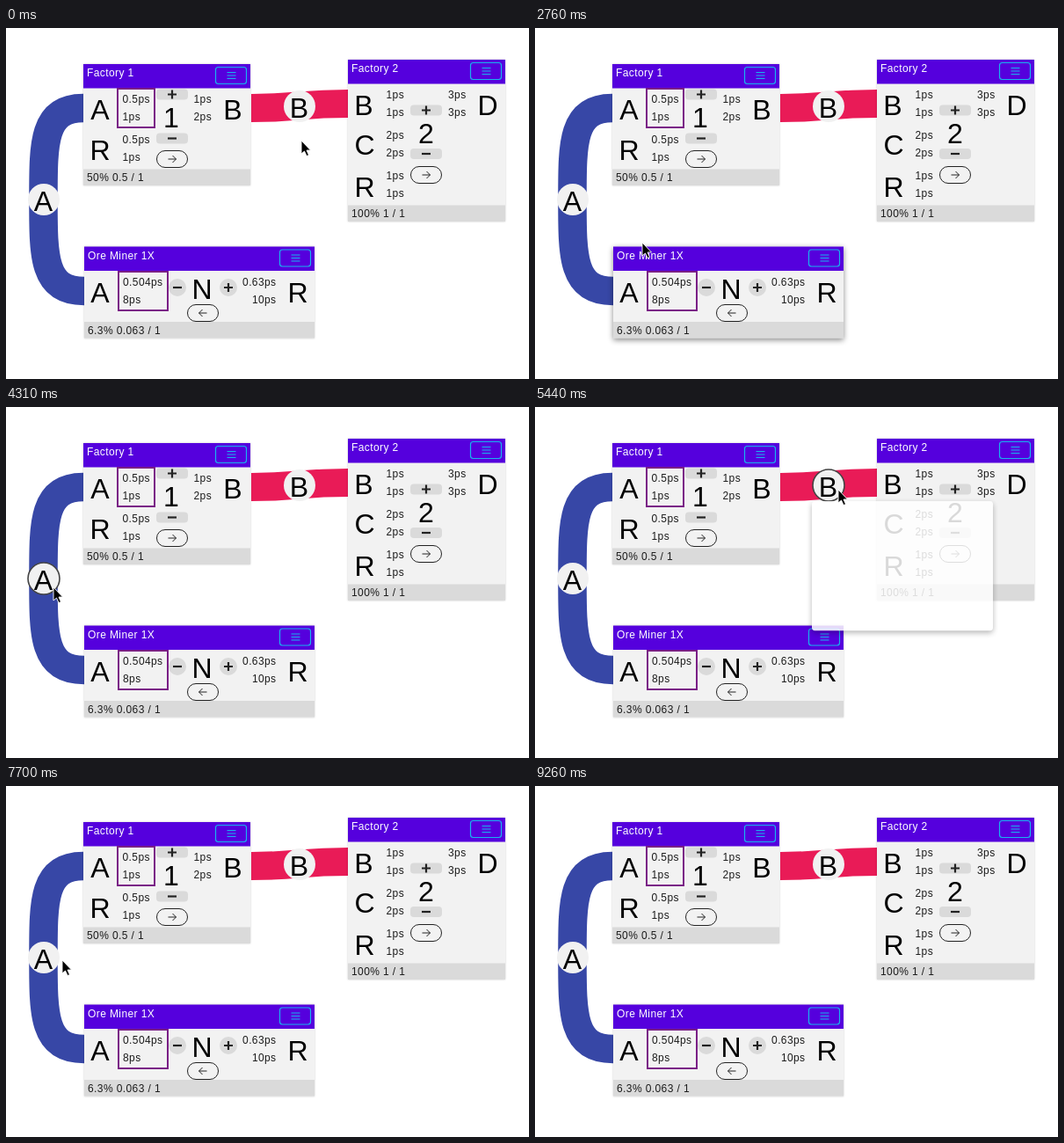
An HTML page that plays this animation: 595x399 px, repeating every 9510 ms.

```html
<!DOCTYPE html>
<html lang="en">
<head>
<meta charset="utf-8">
<title>Factory planner</title>
<style>
html, body { margin: 0; width: 100%; height: 100%; overflow: hidden; background: #fff; }
svg { display: block; width: 595px; height: 399px; }
text { font: 12px "Liberation Sans", Arial, sans-serif; letter-spacing: .4px; fill: #1c1c1c; }
.big { font-size: 32px; letter-spacing: 0; text-anchor: middle; fill: #000; }
.mid { font-size: 16px; letter-spacing: .1px; }
.bold { font-weight: bold; }
.end { text-anchor: end; }
.title { fill: #fff; }
.line { fill: none; stroke: #222; }
.card { filter: drop-shadow(0 0 1px #0003); }
.card.hover { filter: drop-shadow(0 2px 3px #0007); }
.panel { filter: drop-shadow(0 3px 4px #0005); }
.btn { fill: #fff; filter: drop-shadow(0 2px 2px #0005); }
.btn.hover { fill: #e9e9e9; }
</style>
</head>
<body>
<svg id="stage" viewBox="0 0 595 399"></svg>
<script>
const LOOP = 9510;
const stage = document.getElementById('stage');

const text = (x, y, s, cls = '') => `<text x="${x}" y="${y}" class="${cls}">${s}</text>`;
const rect = (x, y, w, h, fill, extra = '') =>
  `<rect x="${x}" y="${y}" width="${w}" height="${h}" fill="${fill}" ${extra}/>`;
const path = (d, extra = 'class="line"') => `<path d="${d}" ${extra}/>`;
const big = (x, y, s) => text(x, y, s, 'big');
const column = (x, ys, labels, cls) => labels.map((s, i) => text(x, ys[i], s, cls)).join('');

const sign = (x, y, plus) =>
  path(`M${x - 5} ${y}h10${plus ? `M${x} ${y - 5}v10` : ''}`, 'fill="none" stroke="#222" stroke-width="2.2"');
const barButton = (x, y, plus) => rect(x - 18, y - 6, 36, 12, '#dadada', 'rx="4"') + sign(x, y, plus);
const roundButton = (x, y, plus) => `<circle cx="${x}" cy="${y}" r="10" fill="#dadada"/>` + sign(x, y, plus);
const pill = (x, y, dir) => rect(x - 17.5, y - 9.5, 35, 19, 'none', 'rx="9.5" stroke="#222"') +
  path(`M${x - 4.5 * dir} ${y}h${9 * dir}m${-4 * dir} -4l${4 * dir} 4l${-4 * dir} 4`);
const portBox = (x, y, w) => rect(x, y, w, 44, 'none', 'stroke="#7a1f86" stroke-width="2"');

const cards = [
  { x: 88, y: 41, w: 190, h: 138, title: 'Factory 1', status: '50% 0.5 / 1',
    body: portBox(127, 69, 42) + big(107, 104, 'A') + big(107, 150, 'R') + big(258, 104, 'B') + big(188, 113, '1') +
      column(132.5, [85, 105, 131, 151], ['0.5ps', '1ps', '0.5ps', '1ps']) +
      column(213.5, [85, 105], ['1ps', '2ps']) +
      barButton(189, 75.5, true) + barButton(189, 125.5) + pill(189, 149, 1) },
  { x: 389, y: 36, w: 179, h: 184, title: 'Factory 2', status: '100% 1 / 1',
    body: big(407, 99, 'B') + big(408, 144, 'C') + big(408, 192, 'R') + big(548, 99, 'D') + big(478, 131, '2') +
      column(432.5, [80, 100, 126, 146, 172, 192], ['1ps', '1ps', '2ps', '2ps', '1ps', '1ps']) +
      column(503, [80, 100], ['3ps', '3ps']) +
      barButton(478, 93.5, true) + barButton(478, 143) + pill(478, 167, 1) },
  { x: 89, y: 248.5, w: 262, h: 104, title: 'Ore Miner 1X', status: '6.3% 0.063 / 1',
    body: portBox(128, 277, 56) + big(107, 312, 'A') + big(223, 308, 'N') + big(332, 312, 'R') +
      column(133, [293, 313], ['0.504ps', '8ps']) + column(307.5, [293, 313], ['0.63ps', '10ps'], 'end') +
      roundButton(195, 295) + roundButton(253, 295, true) + pill(224, 324, -1) },
];

const drawCard = ({ x, y, w, h, title, status, body }) => {
  const menuX = x + w - 39.5;
  return `<g class="card">${rect(x, y, w, h, '#f2f2f2')}${rect(x, y, w, 27.5, '#5500dd')}` +
    rect(x, y + h - 18.5, w, 18.5, '#dadada') +
    rect(menuX, y + 3.5, 35, 19, 'none', 'rx="3" stroke="#18b4ee" stroke-width="1.2"') +
    path(`M${menuX + 13} ${y + 9.5}h10m-10 3.5h10m-10 3.5h10`, 'fill="none" stroke="#18b4ee" stroke-width="1.2"') +
    text(x + 4, y + 14, title, 'title') + text(x + 4, y + h - 5, status) + body + '</g>';
};

const badges = [
  { x: 43, y: 195, name: 'A', rate: '0.5ps' },
  { x: 334, y: 89, name: 'B', rate: '1ps' },
];
const drawBadge = ({ x, y, name }) =>
  `<circle class="badge" cx="${x}" cy="${y}" r="18" fill="#f1f1f1" stroke-width="1.6"/>` + big(x - 0.5, y + 13, name);

// Popup buttons, relative to the popup corner
const BUTTON_Y = 135;
const buttonXs = [32, 64, 210];
const arrowBars = (x, dir) =>
  path(`M${x - 6 * dir} 132v6m${2.5 * dir} -6v6m${2.5 * dir} -6v6`, 'stroke="#111" stroke-width="1.5"') +
  path(`M${x + 7 * dir} 135l${-6 * dir} -4.5v9z`, 'fill="#111"');

const drawPopup = ({ x, y, name, rate }) =>
  `<g class="popup" data-x="${x - 19}" data-y="${y + 18}">${rect(0, 0, 242, 173, '#fff', 'rx="4" class="panel"')}<g class="items">` +
  path('M11 8H7a4 4 0 0 0 0 8h4M13 8h4a4 4 0 0 1 3 7M8 12h3M14 12h2M3 3.5l17 17',
    'fill="none" stroke="#757575" stroke-width="2" transform="translate(16 21)"') +
  text(72, 38, 'Delete', 'mid') + big(31, 94, name) + text(48, 86, rate, 'mid') +
  text(88, 123, 'Logistic S', 'bold') + text(88, 150, '1 x', 'mid') + big(129.5, 158, 'S') + text(156, 150, '1ps', 'mid') +
  buttonXs.map(bx => `<circle class="btn" cx="${bx}" cy="${BUTTON_Y}" r="16"/>`).join('') +
  arrowBars(32, -1) + arrowBars(64, 1) +
  rect(204, 134, 12, 8.5, '#111', 'rx="1"') + '<circle cx="210" cy="138" r="1.4" fill="#fff"/>' +
  path('M208 134v-2.5a2.8 2.8 0 0 1 5.6 0v2.5', 'fill="none" stroke="#111" stroke-width="1.5" transform="translate(2 0)"') +
  '</g></g>';

stage.innerHTML =
  path('M88 91C42 91 42.500 130 42.500 195S42 299 89 299', 'fill="none" stroke="#3747a6" stroke-width="32.5"') +
  path('M279 91C333 91 333 86 389 86', 'fill="none" stroke="#e91b57" stroke-width="32"') +
  cards.map(drawCard).join('') + badges.map(drawBadge).join('') + badges.map(drawPopup).join('') +
  '<g id="cursor">' +
  path('M0 0V15L3.500 12 6 17.500 8.500 16.500 6 11H10.500Z', 'id="arrow" fill="#000" stroke="#fff" stroke-width=".9"') +
  path('M-1.500 9V1a1.500 1.500 0 0 1 3 0V6q3-1 3 1 3-1 3 1 3-1 3 1V12L9 17H1L-5 10q0-3 3.500 0ZM3 10v4M5.500 10v4M8 10v4',
    'id="hand" fill="#fff" stroke="#000" stroke-width="1.2"') + '</g>';

const all = selector => [...stage.querySelectorAll(selector)];
const cardNodes = all('.card'), badgeNodes = all('.badge'), popupNodes = all('.popup');
const cursor = all('#cursor')[0], arrow = all('#arrow')[0], hand = all('#hand')[0];

// Pointer stops: time, x, y
const stops = [
  [0, 336, 128], [70, 336, 128], [240, 345, 94], [980, 345, 94], [1280, 383, 250], [1440, 383, 250],
  [2000, 520, 246], [2120, 520, 246], [2420, 290, 300], [2760, 122, 244], [3080, 40, 199], [3160, 47, 201],
  [4220, 47, 201], [4300, 54, 205], [4380, 54, 205], [4850, 410, 110], [5100, 345, 94], [5820, 345, 94],
  [6230, 383, 250], [6280, 383, 250], [6400, 513, 244], [6550, 513, 244], [7140, 64, 198], [7700, 64, 198],
  [7860, 47, 203], [8660, 47, 203], [8690, 48, 205], [LOOP, 48, 205],
];
const CURSOR_GONE = 8760;

// Badge index, opening time, closing time
const openings = [[1, 500, 2430], [0, 3410, 4215], [1, 5360, 7380], [0, 8030, 9100]];

const clamp = v => Math.max(0, Math.min(1, v));
const smooth = p => p * p * (3 - 2 * p);

function pointerAt(t) {
  const i = stops.findIndex(s => s[0] > t);
  const [t0, x0, y0] = stops[i - 1], [t1, x1, y1] = stops[i];
  const p = smooth((t - t0) / (t1 - t0));
  return [x0 + (x1 - x0) * p, y0 + (y1 - y0) * p];
}

function render(t) {
  const [px, py] = pointerAt(t);
  const present = t < CURSOR_GONE;
  const current = openings.find(([, open, close]) => t >= open && t < close + 125);
  const blocked = current && t > current[1] + 100 && t < current[2];
  const free = present && !blocked;

  cards.forEach((c, i) => cardNodes[i].classList.toggle('hover',
    free && px > c.x && px < c.x + c.w && py > c.y - 6 && py < c.y + c.h));
  badges.forEach((b, i) => badgeNodes[i].setAttribute('stroke',
    free && Math.hypot(px - b.x, py - b.y) < 18 ? '#444' : 'none'));

  let pointing = false;
  popupNodes.forEach((node, i) => {
    const shown = current && current[0] === i;
    node.style.display = shown ? '' : 'none';
    if (!shown) return;
    const age = t - current[1], leaving = t - current[2];
    const x = +node.dataset.x, y = +node.dataset.y;
    const scale = 0.8 + 0.2 * clamp(age / 160) ** 2;
    node.setAttribute('transform', `translate(${x} ${y}) scale(${scale})`);
    node.style.opacity = clamp(age / 95) * (1 - clamp((leaving - 10) / 80));
    node.querySelector('.items').style.opacity = clamp((age - 100) / 400) ** 2;
    node.querySelectorAll('.btn').forEach((button, k) => {
      const over = present && Math.hypot(px - x - buttonXs[k], py - y - BUTTON_Y) < 16;
      button.classList.toggle('hover', over);
      pointing = pointing || over;
    });
  });

  cursor.style.display = present ? '' : 'none';
  cursor.setAttribute('transform', `translate(${px} ${py})`);
  arrow.style.display = pointing ? 'none' : '';
  hand.style.display = pointing ? '' : 'none';
}

const start = performance.now();
function tick() {
  render((performance.now() - start) % LOOP);
  requestAnimationFrame(tick);
}
tick();
</script>
</body>
</html>
```
